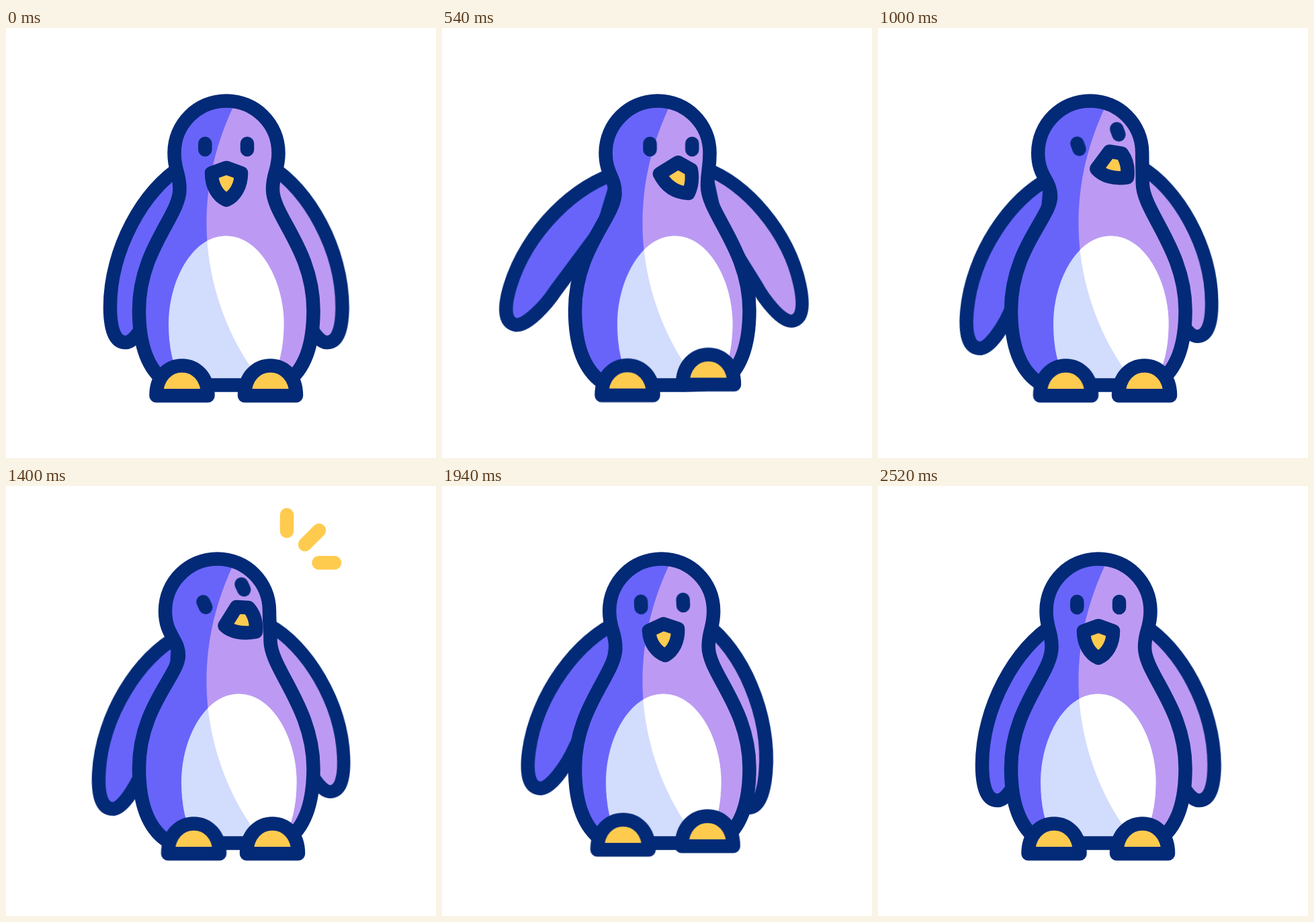
An HTML page without scripts for the animation above (2700 ms loop, 640x640 px).

```html
<!DOCTYPE html>
<html lang="en">
<head>
<meta charset="utf-8">
<title>Penguin</title>
<style>
  html, body { margin: 0; width: 100%; height: 100%; overflow: hidden; background: #fff; }
  svg { display: block; width: 100vw; height: 100vh; }

  .line { stroke: #032a77; stroke-width: 20.5; stroke-linecap: round; stroke-linejoin: round; }
  .blue { fill: #6864fa; }
  .pink { fill: #bc9af3; }
  .yellow { fill: #ffcb4f; }
  .none { fill: none; }

  .body, .belly, .face, .beak, .wing, .foot, .ray {
    animation: 2700ms cubic-bezier(.333, 0, .667, 1) infinite;
  }
  .body { animation-name: body; }
  .belly { animation-name: belly; }
  .face { animation-name: face; transform-origin: 289px 209px; }
  .beak { animation-name: beak; }
  .wing { transform-origin: 250px 220px; }
  .wing.left { animation-name: wing-left; }
  .wing.right { animation-name: wing-right; }
  .foot.left { animation-name: foot-left; }
  .foot.right { animation-name: foot-right; }
  .ray {
    animation-name: ray;
    fill: none; stroke: #ffcb4f; stroke-width: 20.5; stroke-linecap: round;
    stroke-dasharray: 1 3;
  }

  /* facing front, turned aside, looking up */
  @keyframes body {
    0%, 9.81%, 74%, 100% { d: path("M328 108.5C285 108.5 250.5 143 250.5 186C250.5 213 258.5 215 258.5 240C258.5 280 198 330 198 420C198 478 214 510 238 527C270 532 300 531.5 328 531.5C356 531.5 386 532 418 527C442 510 457.5 478 457.5 420C457.5 330 397 280 397 240C397 215 405.5 213 405.5 186C405.5 143 371 108.5 328 108.5Z"); }
    20.56%, 27.41% { d: path("M321 108.5C278.5 108.5 243.5 143 243.5 186C243.5 217 257.5 221 257.5 246C257.5 281 198 330 198 420C198 478 214 510 238 527C270 532 300 531.5 328 531.5C356 531.5 386 532 418 527C442 510 457.5 478 457.5 420C457.5 330 395 276 395 235C395 212 398.5 209 398.5 186C398.5 143 364 108.5 321 108.5Z"); }
    40.74%, 63.26% { d: path("M314.5 108.5C272 108.5 237 143 237 186C237 222 257 228 257 252C257 282 198 330 198 420C198 478 214 510 238 527C270 532 300 531.5 328 531.5C356 531.5 386 532 418 527C442 510 457.5 478 457.5 420C457.5 330 393.5 272 393.5 230C393.5 212 392 205 392 186C392 143 357.5 108.5 314.5 108.5Z"); }
  }
  @keyframes beak {
    0%, 9.81%, 74%, 100% { d: path("M306 216L328 208L350 216C350 235 341 250 328 256C315 250 306 235 306 216Z"); }
    20.56%, 27.41% { d: path("M324 217L351.5 200L371 211C373 222 372 235 367 246C347 245 333 235 324 217Z"); }
    40.74%, 63.26% { d: path("M325.5 208L343 180L361 181C369 190 373 203 372 217C352 221 335 217 325.5 208Z"); }
  }
  @keyframes belly {
    0%, 9.81%, 74%, 100% { transform: none; }
    20.56%, 63.26% { transform: translateX(19px); }
  }
  @keyframes face {
    0%, 9.81%, 74%, 100% { transform: translateX(0) rotate(0deg); }
    20.56%, 27.41% { transform: translateX(13.3px) rotate(0deg); }
    40.74%, 63.26% { transform: translateX(13.3px) rotate(-24.7deg); }
  }

  @keyframes wing-left {
    0%, 4.44%, 93.33%, 100% { transform: translate(0, 0) rotate(0deg); }
    20.93% { transform: translate(-1px, 5px) rotate(17deg); }
    32.22% { transform: translate(-4px, 13px) rotate(6deg); }
    37.04% { transform: translate(-6px, 16px) rotate(5deg); }
    44.44% { transform: translate(-6px, 17px) rotate(4.6deg); }
    51.85%, 57.89% { transform: translate(-6px, 17px) rotate(3.2deg); }
    72.04% { transform: translate(0, -6px) rotate(7.8deg); }
    84.26% { transform: translate(0, 3px) rotate(-3deg); }
  }
  /* mirrored, so positive angles also swing outward */
  @keyframes wing-right {
    0%, 4.44%, 93.33%, 100% { transform: translateX(0) rotate(0deg) scale(1); }
    20.93% { transform: translateX(0) rotate(12.2deg) scale(.95); }
    31.85% { transform: translateX(4px) rotate(-2.5deg) scale(.965); }
    37.04% { transform: translateX(3px) rotate(.7deg) scale(.967); }
    51.85% { transform: translateX(2px) rotate(2.4deg) scale(.96); }
    57.89% { transform: translateX(2px) rotate(3deg) scale(.96); }
    72.04% { transform: translateX(3px) rotate(-5deg) scale(1.02); }
    84.26% { transform: translateX(0) rotate(3deg) scale(.99); }
  }

  @keyframes foot-left {
    0%, 9.81%, 84.26%, 100% { transform: translate(0, 0); }
    15.19%, 25.93% { transform: translate(14px, -17px); }
    20.56% { transform: translate(14px, 0); }
    31.3%, 63.26% { transform: translate(17.5px, 0); }
    68.63% { transform: translate(16px, -17px); }
    74% { transform: translate(3px, 0); }
    79.37% { transform: translate(1px, -17px); }
  }
  @keyframes foot-right {
    0%, 4.44%, 79.37%, 100% { transform: translate(0, 0); }
    9.81% { transform: translate(1.5px, -17px); }
    15.19%, 25.93%, 57.89%, 68.63% { transform: translate(3px, 0); }
    20.56%, 63.26% { transform: translate(3px, -17px); }
    74% { transform: translate(1px, -17px); }
  }

  @keyframes ray {
    0%, 45.18% { stroke-dashoffset: 1; opacity: 0; }
    45.19% { stroke-dashoffset: 1; opacity: 1; }
    51.11%, 54.81% { stroke-dashoffset: 0; opacity: 1; }
    61.48% { stroke-dashoffset: -1; opacity: 1; }
    61.49%, 100% { stroke-dashoffset: -1; opacity: 0; }
  }
</style>
</head>
<body>
<svg viewBox="0 0 640 640">
  <defs>
    <clipPath id="lit">
      <path d="M344 105C312 170 298 230 298.5 295C299 370 325 450 368 510L390 540H640V0H395Z"/>
    </clipPath>
    <path id="wing" d="M262 206C205 240 155 330 155 415C155 455 165 468 178 468C195 468 215 425 222 401L262 290Z"/>
    <path id="belly" d="M327.5 309.5C276 309.5 242 378 242 440C242 475 248 503 262 528H393C407 503 413.5 475 413.5 440C413.5 378 379 309.5 327.5 309.5Z"/>
    <path id="foot" d="M-38.5 547.3C-38.5 518 -20 502.5 0 502.5C20 502.5 38.5 518 38.5 547.3Z"/>
  </defs>

  <g class="wing left"><use href="#wing" class="line blue"/></g>
  <g transform="matrix(-1 0 0 1 655.5 0)">
    <g class="wing right"><use href="#wing" class="line pink"/></g>
  </g>

  <path class="body blue"/>
  <g clip-path="url(#lit)"><path class="body pink"/></g>
  <g class="belly" fill="#d2dcfd"><use href="#belly"/></g>
  <g clip-path="url(#lit)">
    <g class="belly" fill="#fff"><use href="#belly"/></g>
  </g>
  <path class="body line none"/>

  <path class="face line none" d="M296.3 172V181M359 172V181"/>
  <path class="beak line yellow"/>

  <g class="foot left"><use href="#foot" x="262" class="line yellow"/></g>
  <g class="foot right"><use href="#foot" x="393.5" class="line yellow"/></g>

  <path class="ray" pathLength="1" d="M418 67V43"/>
  <path class="ray" pathLength="1" d="M445 87L466 66"/>
  <path class="ray" pathLength="1" d="M465.5 114.3H489"/>
</svg>
</body>
</html>
```
